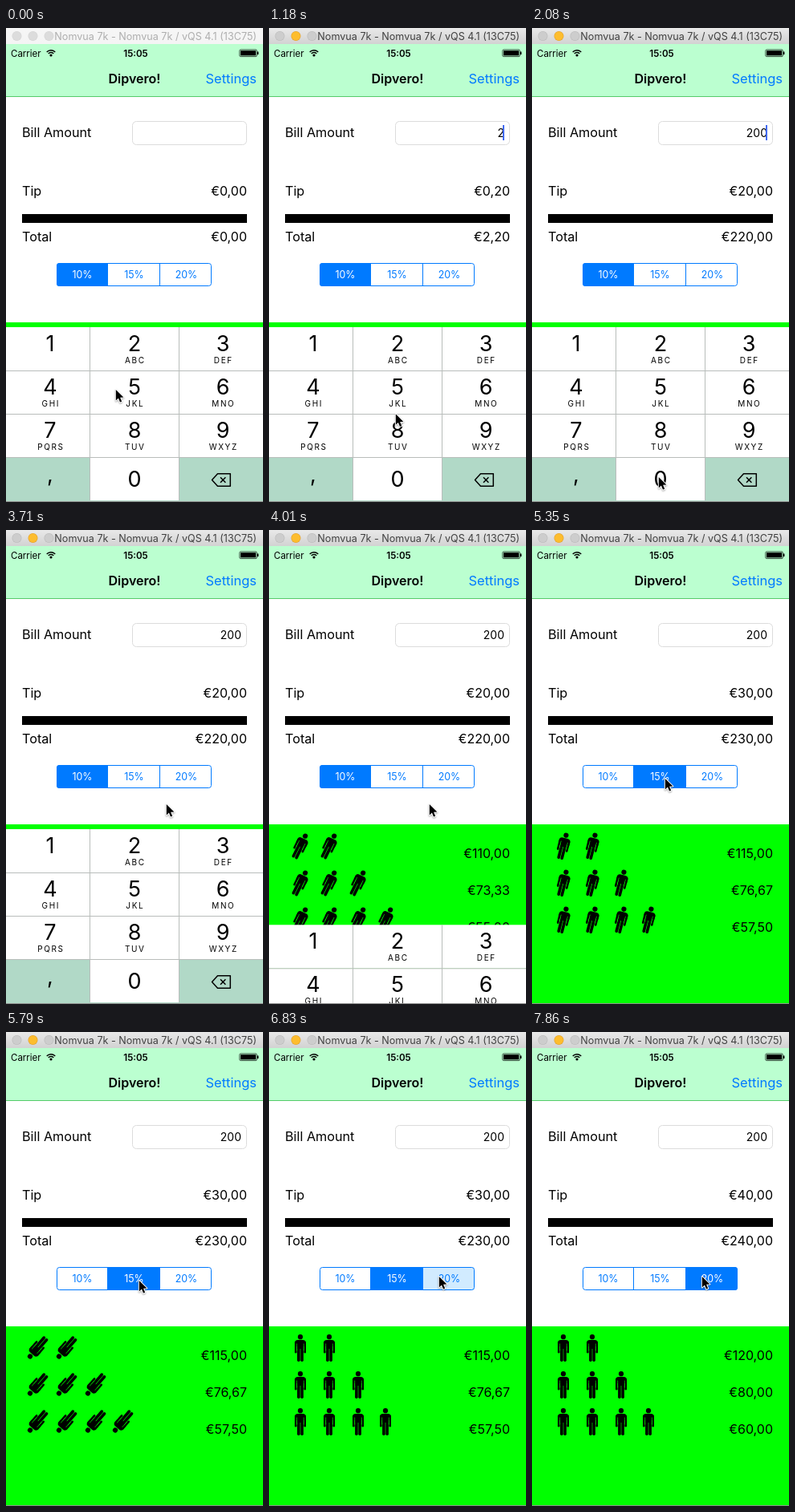
Animation of 320 by 591 pixels, one loop 8000 ms. Source, as an HTML page with a canvas:

```html
<!DOCTYPE html>
<html lang="en">
<head>
<meta charset="utf-8">
<title>Tip calculator</title>
<style>
html, body { margin: 0; width: 100%; height: 100%; overflow: hidden; background: #fff; }
canvas { display: block; width: 320px; height: 591px; }
</style>
</head>
<body>
<canvas id="stage"></canvas>
<script>
const W = 320, H = 591, LOOP = 8000, STEP = LOOP / 54;
const BLUE = '#007aff', MINT = '#bbffd0', GREEN = '#00ff00', KEY_GRAY = '#b1d9c7';
const canvas = document.getElementById('stage');
const ctx = canvas.getContext('2d');
const scale = window.devicePixelRatio || 1;
canvas.width = W * scale;
canvas.height = H * scale;

// Pointer stops: time, x, y
const POINTER = [
  [60, 136, 450], [460, 157, 394], [790, 157, 394], [1270, 157, 559], [3050, 157, 559],
  [3680, 199, 341], [4650, 199, 341], [5030, 165, 309], [6420, 165, 309], [6740, 211, 304]
];
const PRESSES = [['2', 480, 720], ['0', 1320, 1470], ['0', 1900, 2050]];
const TAPS = [[1, 5080, 5205], [2, 6750, 6835]];
const SPINS = [3826, 5205, 6835];
const ACTIVATE = 420, DISMISS = 3870;
const KEYS = [
  ['1', ''], ['2', 'ABC'], ['3', 'DEF'], ['4', 'GHI'], ['5', 'JKL'], ['6', 'MNO'],
  ['7', 'PQRS'], ['8', 'TUV'], ['9', 'WXYZ'], [',', ''], ['0', ''], ['back', '']
];

const clamp = v => Math.max(0, Math.min(1, v));
const progress = (t, start, length) => clamp((t - start) / length);
const easeInOut = p => 0.5 - 0.5 * Math.cos(Math.PI * p);
const easeOut = p => 1 - (1 - p) ** 3;
const euro = v => '€' + v.toFixed(2).replace('.', ',');

function rect(x, y, w, h, color) {
  ctx.fillStyle = color;
  ctx.fillRect(x, y, w, h);
}

function roundRect(x, y, w, h, r) {
  ctx.beginPath();
  ctx.roundRect(x, y, w, h, r);
}

function dot(x, y, r, color) {
  ctx.fillStyle = color;
  ctx.beginPath();
  ctx.arc(x, y, r, 0, 7);
  ctx.fill();
}

function text(str, x, y, size = 16, { align = 'left', color = '#000', weight = 400, spacing = 0 } = {}) {
  ctx.font = `${weight} ${size}px Inter, sans-serif`;
  ctx.letterSpacing = spacing + 'px';
  ctx.textAlign = align;
  ctx.fillStyle = color;
  ctx.fillText(str, x, y);
}

function polygon(points) {
  ctx.beginPath();
  points.forEach(([x, y]) => ctx.lineTo(x, y));
  ctx.closePath();
}

function drawTitleBar(active) {
  const shade = ctx.createLinearGradient(0, 0, 0, 20);
  shade.addColorStop(0, active ? '#e9e9e9' : '#f6f6f6');
  shade.addColorStop(1, active ? '#d2d2d2' : '#f4f4f4');
  rect(0, 0, W, 20, shade);
  [13.5, 33.5, 53.5].forEach((x, i) => {
    const lit = active && i === 1;
    dot(x, 10, 6, lit ? '#e0a030' : active ? '#bababa' : '#d4d4d4');
    dot(x, 10, 5.4, lit ? '#fdbd2e' : active ? '#cdcdcd' : '#dcdcdc');
  });
  text('Nomvua 7k - Nomvua 7k / vQS 4.1 (13C75)', 312, 15, 12.6, { align: 'right', color: active ? '#404040' : '#aeaeae' });
}

function drawHeader() {
  rect(0, 20, W, 65, MINT);
  rect(0, 85, W, 1, '#55cc6a');
  text('Carrier', 6, 35.5, 11.5);
  ctx.strokeStyle = '#000';
  ctx.lineWidth = 1.5;
  [4.4, 7.2].forEach(r => {
    ctx.beginPath();
    ctx.arc(56, 35, r, -Math.PI * 0.76, -Math.PI * 0.24);
    ctx.stroke();
  });
  dot(56, 34, 1.6, '#000');
  text('15:05', 161.5, 35.5, 11.6, { align: 'center', weight: 600 });
  ctx.lineWidth = 0.7;
  roundRect(290.8, 27, 21.6, 8.6, 1.5);
  ctx.stroke();
  rect(292, 28.2, 19.2, 6.2, '#000');
  rect(313, 29.5, 1.4, 3.6, '#000');
  text('Dipvero!', 160, 69, 16, { align: 'center', weight: 600 });
  text('Settings', 312, 69, 16.5, { align: 'right', color: BLUE });
}

function caretOpacity(t) {
  if (t < 150 || t >= DISMISS) return 0;
  const typed = PRESSES.map(p => p[2]).filter(time => time <= t).pop() ?? 150;
  const phase = t - typed;
  if (phase < 560) return 1;
  if (phase < 1000) return 1 - progress(phase, 560, 110);
  return progress(phase, 980, 130) * (1 - progress(phase, 1480, 110));
}

function drawForm(t, bill, tip) {
  text('Bill Amount', 20, 135.5, 16.2);
  ctx.strokeStyle = '#dcdcdc';
  ctx.lineWidth = 1;
  roundRect(157.5, 116.5, 142, 29, 5);
  ctx.stroke();
  if (bill) text(String(bill), 293, 135.5, 14, { align: 'right' });
  ctx.globalAlpha = caretOpacity(t);
  rect(291, 121, 2, 19, '#426bf2');
  ctx.globalAlpha = 1;
  text('Tip', 20, 208.5, 16.2);
  text(euro(tip), 300, 208.5, 16, { align: 'right' });
  rect(20, 232, 280, 11, '#000');
  text('Total', 20, 265.5, 16.2);
  text(euro(bill + tip), 300, 265.5, 16, { align: 'right' });
}

function drawSegments(t, selected) {
  const edges = [63, 127, 192, 257];
  const touched = TAPS.find(([, down, up]) => t >= down && t < up);
  ctx.save();
  roundRect(63, 293, 193, 29, 3.5);
  ctx.clip();
  rect(63, 293, 193, 29, '#fff');
  ['10%', '15%', '20%'].forEach((label, i) => {
    const x = edges[i], w = edges[i + 1] - x;
    if (i === selected) rect(x, 293, w, 29, BLUE);
    else if (touched && touched[0] === i) rect(x, 293, w, 29, '#d1ebff');
    text(label, x + w / 2, 312, 12.4, { align: 'center', color: i === selected ? '#fff' : BLUE });
  });
  rect(126, 293, 1, 29, BLUE);
  rect(191, 293, 1, 29, BLUE);
  ctx.restore();
  ctx.strokeStyle = BLUE;
  ctx.lineWidth = 1;
  roundRect(63.5, 293.5, 192, 28, 3);
  ctx.stroke();
}

function drawPerson(x, y, angle) {
  ctx.save();
  ctx.translate(x, y);
  ctx.rotate(angle);
  dot(0, -13.8, 3.1, '#000');
  roundRect(-7, -10, 14, 8, [4, 4, 0, 0]);
  ctx.fill();
  rect(-3.9, -4, 7.8, 5, '#000');
  for (const side of [-1, 1]) {
    roundRect(side * 5.7 - 1.3, -8, 2.6, 14.5, 1.3);
    ctx.fill();
    roundRect(side * 2.1 - 1.8, -4, 3.6, 21, [0, 0, 1.7, 1.7]);
    ctx.fill();
  }
  rect(-4.5, -5.5, 0.6, 9, GREEN);
  rect(3.9, -5.5, 0.6, 9, GREEN);
  ctx.restore();
}

function drawSplit(t, total) {
  rect(0, 367, W, H - 367, GREEN);
  const start = SPINS.filter(s => s <= t).pop() ?? -LOOP;
  const angle = 2 * Math.PI * easeInOut(progress(t, start, 1000));
  for (let row = 0; row < 3; row++) {
    const people = row + 2;
    [39, 75, 111, 145].slice(0, people).forEach(x => drawPerson(x, 394 + row * 46, angle));
    text(euro(total / people), 300, 408.5 + row * 46, 16, { align: 'right' });
  }
}

function drawBackspace() {
  ctx.strokeStyle = '#000';
  ctx.lineWidth = 1.5;
  ctx.lineJoin = 'round';
  polygon([[256.5, 563.5], [263.5, 555.7], [279.3, 555.7], [279.3, 571.3], [263.5, 571.3]]);
  ctx.stroke();
  ctx.beginPath();
  for (const side of [-1, 1]) {
    ctx.moveTo(267, 563.5 - side * 3.2);
    ctx.lineTo(273.4, 563.5 + side * 3.2);
  }
  ctx.stroke();
}

function drawKeyboard(t) {
  const shift = 218 * easeOut(progress(t, DISMISS, 560));
  if (shift >= 217) return;
  const columns = [0, 105, 216, 320], centers = [55, 160, 270];
  const pressed = PRESSES.find(([, down, up]) => t >= down && t < up);
  ctx.save();
  ctx.translate(0, shift);
  KEYS.forEach(([digit, letters], i) => {
    const col = i % 3, top = 373 + Math.floor(i / 3) * 54;
    const gray = i === 9 || i === 11 || (pressed && pressed[0] === digit);
    rect(columns[col], top, columns[col + 1] - columns[col], 54, gray ? KEY_GRAY : '#fff');
    if (digit === 'back') return drawBackspace();
    const baseline = digit === '0' ? 572 : digit === ',' ? 566 : top + 30;
    text(digit, centers[col], baseline, 27, { align: 'center' });
    text(letters, centers[col] + 0.8, top + 45, 10, { align: 'center', spacing: 1.6 });
  });
  [427, 481, 535].forEach(y => rect(0, y, W, 1, '#b9bdbb'));
  [104, 215].forEach(x => rect(x, 373, 1, 216, '#b9bdbb'));
  rect(0, 589, W, 2, KEY_GRAY);
  ctx.restore();
}

function drawPointer(t) {
  let [, x, y] = POINTER[0];
  for (let i = 1; i < POINTER.length; i++) {
    const [from, x0, y0] = POINTER[i - 1], [to, x1, y1] = POINTER[i];
    if (t < from) break;
    const p = easeInOut(progress(t, from, to - from));
    x = x0 + (x1 - x0) * p;
    y = y0 + (y1 - y0) * p;
  }
  ctx.save();
  ctx.translate(x + 0.8, y + 1);
  ctx.lineJoin = 'round';
  polygon([[0, 0], [0, 13.4], [3.1, 10.6], [5.2, 15.6], [7.4, 14.7], [5.3, 9.8], [9.6, 9.6]]);
  ctx.shadowColor = 'rgba(0,0,0,.35)';
  ctx.shadowBlur = 2 * scale;
  ctx.shadowOffsetY = scale;
  ctx.strokeStyle = '#fff';
  ctx.lineWidth = 2;
  ctx.stroke();
  ctx.shadowColor = 'transparent';
  ctx.fillStyle = '#000';
  ctx.fill();
  ctx.restore();
}

function draw(t) {
  const bill = Number(PRESSES.filter(p => p[2] <= t).map(p => p[0]).join(''));
  const selected = TAPS.filter(tap => tap[2] <= t).length;
  const tip = bill * (10 + selected * 5) / 100;
  ctx.setTransform(scale, 0, 0, scale, 0, 0);
  rect(0, 0, W, H, '#fff');
  drawHeader();
  drawForm(t, bill, tip);
  drawSegments(t, selected);
  drawSplit(t, bill + tip);
  drawKeyboard(t);
  drawTitleBar(t >= ACTIVATE);
  rect(0, 590, W, 1, '#8c8c8c');
  drawPointer(t);
}

function frame() {
  const t = performance.now() % LOOP;
  draw(Math.floor(t / STEP) * STEP);
  requestAnimationFrame(frame);
}
frame();
</script>
</body>
</html>
```
